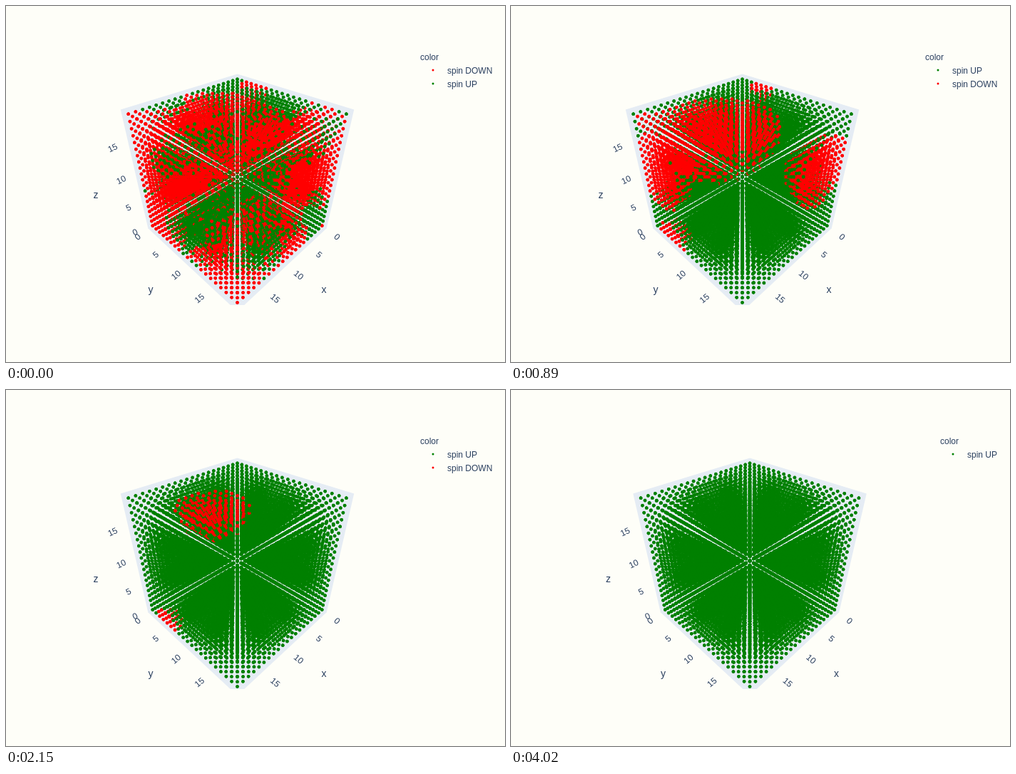
Animation of 700 by 500 pixels, one loop 6850 ms. Source, as an HTML page with a canvas:

```html
<!DOCTYPE html>
<html lang="en">
<head>
<meta charset="utf-8">
<title>Spin lattice</title>
<style>
  html, body { margin: 0; width: 100%; height: 100%; overflow: hidden; background: #fefef8; }
  canvas { display: block; }
</style>
</head>
<body>
<canvas id="stage" width="700" height="500"></canvas>
<script>
const ctx = document.getElementById('stage').getContext('2d');
const LOOP = 6850, STEP = 30, END = 4020, SWAP = 420;
const N = 20, CX = 324.5, CY = 240, FOCAL = 434.6, DOT = 2.45;
// Half sizes of lattice and box, then tick and title distances, in camera distances
const LATTICE = .2175, BOX = .2309, TICK = .28, TITLE = .365;
const RED = '#ff0000', GREEN = '#008000', INK = '#2a3f5f', PAPER = '#fefef8', WALL = '#e5ecf4';
const FONT = 'px "Liberation Sans", Arial, sans-serif';

const place = i => (i / (N - 1) * 2 - 1) * LATTICE;

// The camera looks along (1,1,1).
function project(x, y, z) {
  const depth = 1 - (x + y + z) / Math.sqrt(3);
  return {
    sx: CX + FOCAL * (y - x) / Math.SQRT2 / depth,
    sy: CY - FOCAL * (2 * z - x - y) / Math.sqrt(6) / depth,
    depth
  };
}

// Red balls in the lattice; their surface shrinks evenly until they vanish.
const domains = [
  { at: [13, 9, 19], radius: 9, life: 2800 },
  { at: [19, 4.6, 19], radius: 5.5, life: 1950 },
  { at: [19, 2.5, 11], radius: 8, life: 1600 },
  { at: [4, 19, 12], radius: 8, life: 1500 },
  { at: [19, 4, 0], radius: 3.5, life: 4010 },
  { at: [0, 4.5, 19], radius: 3, life: 2080 },
  { at: [19, 16, 2], radius: 4.5, life: 500 },
  { at: [10, 19, 0], radius: 6, life: 450 }
];

const lifeIn = ({ at: [a, b, c], radius, life }, x, y, z) =>
  life * (1 - ((x - a) ** 2 + (y - b) ** 2 + (z - c) ** 2) / radius ** 2);

// Nothing flips during the two pauses.
function skipPauses(t) {
  if (t > 2830 && t < 3370) return 3370;
  if (t > 3400 && t < 3730) return 3730;
  return t;
}

function makeSpin(x, y, z) {
  const hash = Math.sin(x * 12.99 + y * 78.23 + z * 37.72) * 43758.55;
  const grain = hash - Math.floor(hash) - .5;
  const noise = (Math.sin(.7 * x + .4 * y + 1) + Math.sin(.6 * y - .5 * z + 2) +
    Math.sin(.65 * z + .5 * x + 4)) / 3 + .5 * grain;
  const life = Math.max(...domains.map(d => lifeIn(d, x, y, z)));
  return {
    ...project(place(x), place(y), place(z)),
    birth: 400 * (-noise - .35),
    death: skipPauses(Math.min(4010, Math.max(life * (1 + .06 * grain), 600 * (noise - .3))))
  };
}

const spins = [];
for (let x = 0; x < N; x++)
  for (let y = 0; y < N; y++)
    for (let z = 0; z < N; z++) spins.push(makeSpin(x, y, z));
spins.sort((a, b) => b.depth - a.depth);

function circle(c, x, y, r, color) {
  c.fillStyle = color;
  c.beginPath();
  c.arc(x, y, r, 0, 2 * Math.PI);
  c.fill();
}

function makeDot(color) {
  const dot = document.createElement('canvas');
  dot.width = dot.height = 16;
  circle(dot.getContext('2d'), 8, 8, DOT * 2, color);
  return dot;
}
const redDot = makeDot(RED), greenDot = makeDot(GREEN);

function label(text, { sx, sy }, degrees, size) {
  ctx.save();
  ctx.translate(sx, sy);
  ctx.rotate(degrees * Math.PI / 180);
  ctx.font = size + FONT;
  ctx.textAlign = 'center';
  ctx.textBaseline = 'middle';
  ctx.fillStyle = INK;
  ctx.fillText(text, 0, 0);
  ctx.restore();
}

function drawAxis(name, degrees, point) {
  for (let i = 0; i < N; i += 5) label(i, point(place(i), TICK), degrees, 12);
  label(name, point(0, TITLE), 0, 14);
}

function drawAxes() {
  drawAxis('x', 40, (v, out) => project(v, out, -BOX));
  drawAxis('y', -40, (v, out) => project(out, v, -BOX));
  drawAxis('z', -25, (v, out) => project(out, -BOX, v));
}

function drawWalls() {
  ctx.fillStyle = WALL;
  ctx.beginPath();
  for (let i = 0; i < 6; i++) {
    const corner = [4, 2, 0].map(c => BOX * Math.sign(Math.cos((i - c) * Math.PI / 3)));
    const p = project(...corner);
    ctx.lineTo(p.sx, p.sy);
  }
  ctx.fill();
}

function drawLattice(t) {
  ctx.save();
  ctx.beginPath();
  ctx.rect(0, 60, 700, 360);
  ctx.clip();
  drawWalls();
  for (const p of spins) {
    const dot = t >= p.birth && t < p.death ? redDot : greenDot;
    ctx.drawImage(dot, p.sx - 4, p.sy - 4, 8, 8);
  }
  ctx.restore();
}

function drawLegend(t) {
  const up = ['spin UP', GREEN], down = ['spin DOWN', RED];
  const rows = t >= END ? [up] : t < SWAP ? [down, up] : [up, down];
  const x = t >= END ? 602 : 581;
  ctx.font = 12 + FONT;
  ctx.fillStyle = INK;
  ctx.fillText('color', x, 76);
  rows.forEach(([name, color], i) => {
    circle(ctx, x + 18, 90 + 19 * i, 1.5, color);
    ctx.fillStyle = INK;
    ctx.fillText(name, x + 38, 95 + 19 * i);
  });
}

function draw(t) {
  ctx.fillStyle = PAPER;
  ctx.fillRect(0, 0, 700, 500);
  ctx.save();
  if (t >= END) ctx.translate(10.5, 0);
  drawLattice(t);
  drawAxes();
  ctx.restore();
  drawLegend(t);
}

const start = performance.now();
let shown = -1;
function frame() {
  const time = (performance.now() - start) % LOOP;
  const t = Math.min(END, Math.floor(time / STEP) * STEP);
  if (t !== shown) draw(shown = t);
  requestAnimationFrame(frame);
}
frame();
</script>
</body>
</html>
```
